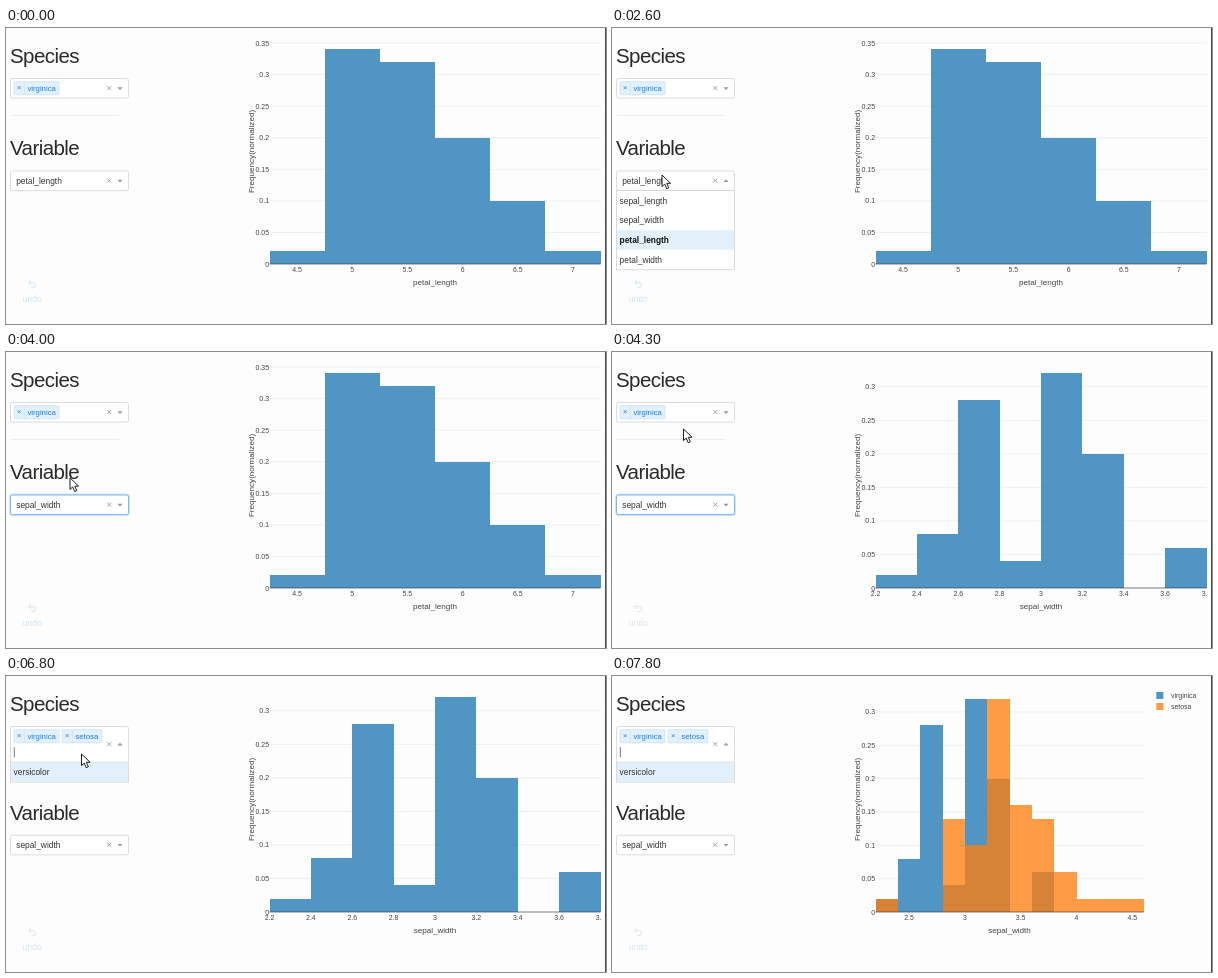
Write an HTML page that moves like this. It is 600 by 296 pixels and loops after 8000 ms.

```html
<!DOCTYPE html>
<html lang="en">
<head>
<meta charset="utf-8">
<title>Iris histogram</title>
<style>
  html, body { margin: 0; width: 100%; height: 100%; overflow: hidden; background: #fdfdfe; }
  svg { display: block; width: 600px; height: 296px; font-family: "Liberation Sans", Arial, sans-serif; white-space: pre; }
</style>
</head>
<body>
<svg id="stage" viewBox="0 0 600 296"></svg>
<script>
const LOOP = 8000, TICK = 100;
const BLUE = '#1f77b4', ORANGE = '#ff7f0e', INK = '#333';
const LEFT = 263.5, BASE = 236;
const VARIABLES = ['sepal_length', 'sepal_width', 'petal_length', 'petal_width'];

const VIRGINICA = [.02, .08, .28, .04, .32, .2, 0, .06];
const SETOSA = [.02, 0, 0, .14, .1, .32, .16, .14, .06, .02, .02, .02];
const CHARTS = {
  petal: { name: 'petal_length', from: 4.25, to: 7.25, bin: .5, right: 594.5, scale: 631.4, top: 7,
           ticks: [4.5, 5, 5.5, 6, 6.5, 7], series: [[.02, .34, .32, .2, .1, .02]] },
  sepal: { name: 'sepal_width', from: 2.2, to: 3.8, bin: .2, right: 594.5, scale: 671, top: 6,
           ticks: [2.2, 2.4, 2.6, 2.8, 3, 3.2, 3.4, 3.6, 3.8], series: [VIRGINICA] },
  both:  { name: 'sepal_width', from: 2.2, to: 4.6, bin: .2, right: 531.5, scale: 667, top: 6,
           ticks: [2.5, 3, 3.5, 4, 4.5], series: [VIRGINICA, SETOSA] }
};

// Pointer tip: time, x, y
const PATH = [
  [600, 46, 215], [900, 28, 100], [1100, 28, 90], [1500, 26, 59.5], [1900, 14, 59.5], [2300, 50, 146],
  [2600, 50, 147], [3300, 56, 195.5], [3800, 56, 195.5], [4100, 68, 91], [4200, 68, 91],
  [4300, 71.5, 77], [4500, 75, 55], [4700, 75, 55], [4900, 75.5, 66],
  [5600, 75.5, 66], [5900, 75.5, 78], [7700, 75.5, 78]
];

function pointerAt(t) {
  const i = PATH.findIndex(p => p[0] > t);
  if (i < 1) return null;
  const [t0, x0, y0] = PATH[i - 1], [t1, x1, y1] = PATH[i];
  const k = (t - t0) / (t1 - t0);
  return { x: x0 + (x1 - x0) * k, y: y0 + (y1 - y0) * k };
}

const text = (s, x, y, size, fill = INK, extra = '') =>
  `<text x="${x}" y="${y}" font-size="${size}" fill="${fill}" ${extra}>${s}</text>`;
const rect = (x, y, w, h, fill, extra = '') =>
  `<rect x="${x}" y="${y}" width="${w}" height="${h}" fill="${fill}" ${extra}/>`;
const path = (d, stroke, width = 1, fill = 'none', extra = '') =>
  `<path d="${d}" stroke="${stroke}" stroke-width="${width}" fill="${fill}" ${extra}/>`;
const middle = 'text-anchor="middle"', end = 'text-anchor="end"';

function chart(c) {
  const perUnit = (c.right - LEFT) / (c.to - c.from), barW = perUnit * c.bin;
  const mid = (LEFT + c.right) / 2;
  let grid = '', bars = '', labels = '';
  for (let i = 0; i <= c.top; i++) {
    const y = BASE - i * .05 * c.scale;
    if (i) grid += path(`M${LEFT} ${y}H${c.right}`, '#ececee', .8);
    labels += text(+(i * .05).toFixed(2), 263, y + 2.5, 6.94, '#444', end);
  }
  c.series.forEach((values, s) => values.forEach((v, i) => {
    if (v) bars += rect(LEFT + i * barW, BASE - v * c.scale, barW, v * c.scale,
      s ? ORANGE : BLUE, 'opacity=".77" shape-rendering="crispEdges"');
  }));
  for (const v of c.ticks)
    labels += text(v, LEFT + (v - c.from) * perUnit, 243.9, 6.94, '#444', middle);
  if (c.series.length > 1) ['virginica', 'setosa'].forEach((name, i) => {
    labels += rect(544.3, 16 + i * 11, 7, 7, i ? ORANGE : BLUE, 'opacity=".77"')
            + text(name, 559, 22 + i * 11, 6.94, '#444');
  });
  return grid + bars + path(`M${LEFT} ${BASE}H${c.right}`, '#444', .7)
    + `<g clip-path="url(#plot)">${labels}</g>`
    + text(c.name, mid, 257, 8.1, '#444', middle)
    + text('Frequency(normalized)', 0, 0, 8.1, '#444', `${middle} transform="translate(248 123.5) rotate(-90)"`);
}

const cross = (x, y, r, color, w) =>
  path(`M${x - r} ${y - r}l${2 * r} ${2 * r}m0 ${-2 * r}l${-2 * r} ${2 * r}`, color, w);

function control(y, h, open, focus) {
  const cy = y + h / 2, d = open ? -1 : 1;
  return (focus ? rect(3.9, y - .6, 119.2, h + 1.2, 'none', 'rx="2.8" stroke="#cfe5fb" stroke-width="1.6"') : '')
    + rect(4.5, y, 118, h, '#fff', `rx="2" stroke="${focus ? '#5aa6f2' : '#d3d3d6'}" stroke-width=".8"`)
    + cross(103.3, cy - .2, 2, '#999', .9)
    + path(`M111.4 ${cy - d * 1.1}h5.2l-2.6 ${d * 2.7}z`, 'none', 0, '#999');
}

function tag(name, x, w) {
  return rect(x, 53.7, w, 13, '#e3f1fd', 'rx="1" stroke="#c2e0fb" stroke-width=".7"')
    + path(`M${x + 10} 53.7v13`, '#c2e0fb', .7)
    + cross(x + 5, 59.7, 1.5, '#1d84dc', .8)
    + text(name, x + 13.2, 62.7, 7.75, '#1580dd');
}

function menu(y, options, active, chosen) {
  const step = 19.8, h = options.length * step;
  return rect(4.5, y, 118, h, '#fff', 'stroke="#d0d0d3" stroke-width=".8"')
    + options.map((name, i) =>
        (i === active ? rect(4.9, y + i * step, 117.2, step - .3, '#e2f0fb') : '')
        + text(name, 7.6, y + i * step + 13, 8.4, name === chosen ? '#111' : INK,
            name === chosen ? 'font-weight="bold"' : '')).join('');
}

// Option under the pointer, or the fallback when it is outside the menu
function hovered(tip, y, count, fallback) {
  const i = tip ? Math.floor((tip.y - y) / 19.8) : -1;
  return i >= 0 && i < count ? i : fallback;
}

const heading = (s, y) => text(s, 4, y, 20.5, '#2a2a2a', 'letter-spacing="-.57"');
const caret = (x, y) => path(`M${x} ${y}v10`, '#555', .8);

function undo(color) {
  return path('M23.6 254.7H27a2.5 2.5 0 0 1 0 5H25.2', color, 1)
    + path('M25.2 252.2l-2.6 2.5l2.6 2.5', color, 1)
    + text('undo', 26.3, 274, 8.6, color, middle);
}

function scene(t) {
  const tip = pointerAt(t);
  const between = (a, b) => t >= a && t < b;
  const two = t >= 6500, shift = two ? 16.2 : 0;
  const speciesOpen = t >= 5300, variableOpen = between(2600, 3500);
  const variable = t < 3500 ? 'petal_length' : 'sepal_width';
  const boxH = 19.6 + shift, menuY = 50.5 + boxH;

  let out = '<clipPath id="plot"><path d="M0 0H595.3V296H0z"/></clipPath>'
    + rect(0, 0, 600, 296, '#fdfdfe') + rect(599, 0, 1, 296, '#4a4a4c')
    + chart(t < 4300 ? CHARTS.petal : t < 6900 ? CHARTS.sepal : CHARTS.both)
    + heading('Species', 35)
    + path(`M5 ${87.3 + shift}H113`, '#ebe8ea', .9)
    + heading('Variable', 127.3 + shift)
    + undo(t < 4300 ? '#d0e4f3' : '#d9e7ee');

  out += control(143 + shift, 19.6, variableOpen, between(3500, 5300))
    + text(variable, 10.2, 155.6 + shift, 8.4);
  if (variableOpen)
    out += menu(162.6, VARIABLES, hovered(tip, 162.6, 4, 2), variable);

  out += control(50.5, boxH, speciesOpen, false) + tag('virginica', 8.2, 44.8);
  if (two) out += tag('setosa', 56.2, 39.6);
  if (speciesOpen) {
    const options = two ? ['versicolor'] : ['setosa', 'versicolor'];
    out += menu(menuY, options, hovered(tip, menuY, options.length, options.length - 1));
  }
  if (between(5600, 5900)) out += caret(56.4, 55);
  if (between(6800, 7200) || t >= 7800) out += caret(8.3, 71.3);

  if (tip) out += path('M0 0V11.6L2.7 9.1L4.7 13.7L6.8 12.8L4.8 8.3H8.6Z', '#1a1a1a', 1, '#fff',
    `stroke-linejoin="round" transform="translate(${tip.x} ${tip.y})"`);
  return out;
}

const stage = document.getElementById('stage');
let shown = -1, start = performance.now();
function frame() {
  const now = performance.now() - start;
  const t = Math.floor((now % LOOP) / TICK) * TICK;
  if (t !== shown) stage.innerHTML = scene(shown = t);
  requestAnimationFrame(frame);
}
frame();
</script>
</body>
</html>
```
